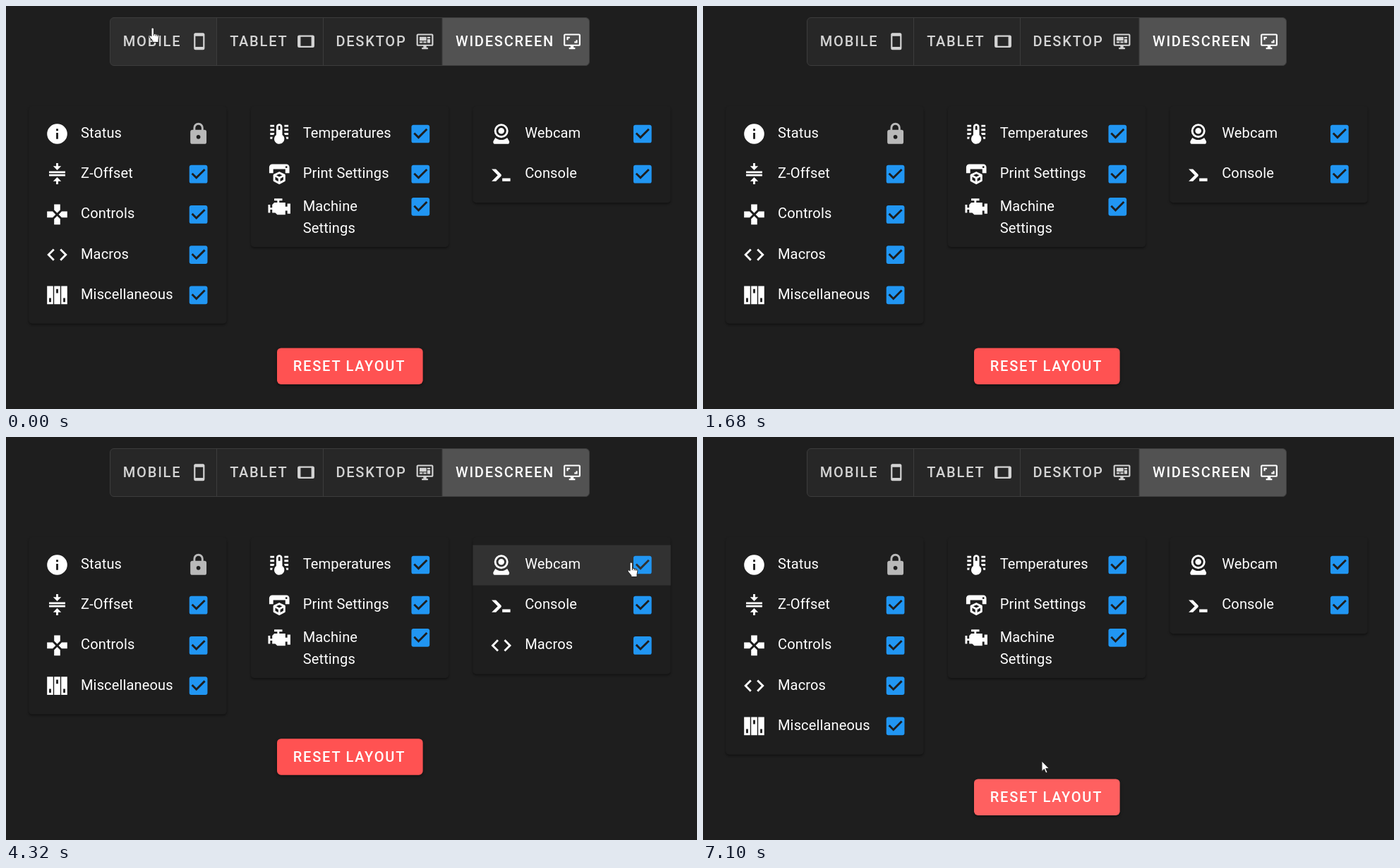
These frames come from a looping animation (979 by 572 pixels, 7170 ms). An HTML page:

```html
<!DOCTYPE html>
<html lang="en">
<head>
<meta charset="utf-8">
<title>Dashboard layout</title>
<style>
html, body { margin: 0; width: 100%; height: 100%; overflow: hidden; background: #1e1e1e; }
svg { display: block; }
#stage { width: 979px; height: 572px; }
text { font: 400 20.02px Roboto, sans-serif; letter-spacing: .143px; fill: #fff; }
.btn { font-weight: 500; letter-spacing: 1.79px; }
.card { fill: #1e1e1e; filter: drop-shadow(0 2px 1.5px rgba(0,0,0,.4)); }
.reset { fill: #ff5252; filter: drop-shadow(0 2px 2px rgba(0,0,0,.4)); }
.line { fill: none; stroke: #3c3c3c; }
</style>
</head>
<body>
<svg id="stage" viewBox="0 0 979 572"></svg>
<script>
const LOOP = 7170, ROW = 57.2, TALL = 62.9, TOP = 153.4, PAD = 11.4, S = 1.43;
const BLUE = [33, 150, 243], GREY = [183, 183, 183];

const ICON = {
  Status: 'M13,9H11V7H13M13,17H11V11H13M12,2A10,10 0 0,0 2,12A10,10 0 0,0 12,22A10,10 0 0,0 22,12A10,10 0 0,0 12,2Z',
  'Z-Offset': 'M4,12H20V14H4V12M4,9H20V11H4V9M16,4L12,8L8,4H11V1H13V4H16M8,19L12,15L16,19H13V22H11V19H8Z',
  Controls: 'M16.5,9L13.5,12L16.5,15H22V9M9,16.5V22H15V16.5L12,13.5M7.5,9H2V15H7.5L10.5,12M15,7.5V2H9V7.5L12,10.5L15,7.5Z',
  Macros: 'M14.6,16.6L19.2,12L14.6,7.4L16,6L22,12L16,18L14.6,16.6M9.4,16.6L4.8,12L9.4,7.4L8,6L2,12L8,18L9.4,16.6Z',
  Miscellaneous: 'M2,3H8V21H2ZM4,15V19H6V15ZM9,3H15V21H9ZM11,6V10H13V6ZM16,3H22V21H16ZM18,15V19H20V15Z',
  Temperatures: 'M17 3H21V5H17V3M17 7H21V9H17V7M17 11H21V13H17.75L17 12.1V11M21 15V17H19C18.97 16.31 18.83 15.63 18.58 15H21M7 3V5H3V3H7M7 7V9H3V7H7M7 11V12.1L6.25 13H3V11H7M3 15H5.42C5.17 15.63 5.03 16.31 5 17H3V15M15 13V5C15 3.34 13.66 2 12 2S9 3.34 9 5V13C6.79 14.66 6.34 17.79 8 20S12.79 22.66 15 21 17.66 16.21 16 14C15.72 13.62 15.38 13.28 15 13M12 4C12.55 4 13 4.45 13 5V8H11V5C11 4.45 11.45 4 12 4Z',
  'Print Settings': 'M19,6A1,1 0 0,0 20,5A1,1 0 0,0 19,4A1,1 0 0,0 18,5A1,1 0 0,0 19,6M19,2A3,3 0 0,1 22,5V11H18V7H6V11H2V5A3,3 0 0,1 5,2H19M18,18.25C18,18.63 17.79,18.96 17.47,19.13L12.57,21.82C12.4,21.94 12.21,22 12,22C11.79,22 11.59,21.94 11.43,21.82L6.53,19.13C6.21,18.96 6,18.63 6,18.25V13C6,12.62 6.21,12.29 6.53,12.12L11.43,9.68C11.59,9.56 11.79,9.5 12,9.5C12.21,9.5 12.4,9.56 12.57,9.68L17.47,12.12C17.79,12.29 18,12.62 18,13V18.25M12,11.65L9.04,13L12,14.6L14.96,13L12,11.65M8,17.66L11,19.29V16.33L8,14.71V17.66M16,17.66V14.71L13,16.33V19.29L16,17.66Z',
  'Machine Settings': 'M7,4V6H10V8H7L5,10V13H3V10H1V18H3V15H5V18H8L10,20H18V16H20V19H23V9H20V12H18V8H12V6H15V4H7Z',
  Webcam: 'M12,2A7,7 0 0,1 19,9A7,7 0 0,1 12,16A7,7 0 0,1 5,9A7,7 0 0,1 12,2M12,4A5,5 0 0,0 7,9A5,5 0 0,0 12,14A5,5 0 0,0 17,9A5,5 0 0,0 12,4M12,6A3,3 0 0,1 15,9A3,3 0 0,1 12,12A3,3 0 0,1 9,9A3,3 0 0,1 12,6M6,22A2,2 0 0,1 4,20C4,19.62 4.1,19.27 4.29,18.97L6.11,15.81C7.69,17.17 9.75,18 12,18C14.25,18 16.31,17.17 17.89,15.81L19.71,18.97C19.9,19.27 20,19.62 20,20A2,2 0 0,1 18,22H6Z',
  Console: 'M13,19V16H21V19H13M8.5,13L2.47,7H6.71L11.67,11.95C12.25,12.54 12.25,13.5 11.67,14.07L6.74,19H2.5L8.5,13Z'
};
const LOCK = 'M12,17A2,2 0 0,0 14,15C14,13.89 13.1,13 12,13A2,2 0 0,0 10,15A2,2 0 0,0 12,17M18,8A2,2 0 0,1 20,10V20A2,2 0 0,1 18,22H6A2,2 0 0,1 4,20V10C4,8.89 4.9,8 6,8H7V6A5,5 0 0,1 12,1A5,5 0 0,1 17,6V8H18M12,3A3,3 0 0,0 9,6V8H15V6A3,3 0 0,0 12,3Z';
const BOX = 'M19,3H5C3.89,3 3,3.89 3,5V19A2,2 0 0,0 5,21H19A2,2 0 0,0 21,19V5C21,3.89 20.1,3 19,3';
const CHECKED = 'M10,17L5,12L6.41,10.58L10,14.17L17.59,6.58L19,8' + BOX + 'Z';
const BLANK = BOX + 'M19,5V19H5V5H19Z';

const SCREEN = 'M21,16V4H3V16H21M21,2A2,2 0 0,1 23,4V16A2,2 0 0,1 21,18H14V20H16V22H8V20H10V18H3C1.89,18 1,17.1 1,16V4C1,2.89 1.89,2 3,2H21';
// label, left, right, text x, icon centre, icon
const TABS = [
  ['MOBILE', 147.5, 298, 165.8, 273.8, 'M17,19H7V5H17M17,1H7C5.89,1 5,1.89 5,3V21A2,2 0 0,0 7,23H17A2,2 0 0,0 19,21V3C19,1.89 18.1,1 17,1Z'],
  ['TABLET', 298, 449, 317.2, 425, 'M19,18H5V6H19M21,4H3C1.89,4 1,4.89 1,6V18A2,2 0 0,0 3,20H21A2,2 0 0,0 23,18V6C23,4.89 22.1,4 21,4Z'],
  ['DESKTOP', 449, 618, 467.4, 593.5, SCREEN + 'M5,6H14V11H5V6M15,6H19V8H15V6M19,9V14H15V9H19M5,12H9V14H5V12M10,12H14V14H10V12Z'],
  ['WIDESCREEN', 618, 826.5, 637, 802, SCREEN + 'M9,6H5V10H7V8H9V6M19,10H17V12H15V14H19V10Z']
];
const TAB_CLICK = [60, 524, 900, 1280];

const split = s => s.split('|').map(c => c.split(','));
const MOBILE = split('Status,Print Settings,Z-Offset,Macros,Controls,Machine Settings,Miscellaneous,Temperatures,Webcam,Console');
const TABLET = split('Status,Webcam,Z-Offset,Controls,Macros,Print Settings,Miscellaneous|Temperatures,Machine Settings,Console');
const DESKTOP = split('Status,Webcam,Z-Offset,Controls,Macros,Miscellaneous|Temperatures,Print Settings,Machine Settings,Console');
const WIDE = split('Status,Z-Offset,Controls,Macros,Miscellaneous|Temperatures,Print Settings,Machine Settings|Webcam,Console');
const COLUMNS = { 1: [272], 2: [34, 508], 3: [32.2, 346.9, 661.4] };

const DRAG = 2400, DROP = 3400, RESET = 6780;
const TOGGLED = { Webcam: 4440, 'Machine Settings': 5620 };
const RING_END = { Webcam: 5800, 'Machine Settings': 6700 };

// time, x, y
const PATH = [
  [0, 207, 31], [485, 207, 31], [490, 403, 28], [750, 403, 28], [880, 545, 34],
  [1120, 545, 34], [1260, 745, 34], [1600, 745, 34], [1740, 560, 210], [2030, 262, 398],
  [2240, 79, 349], [2380, 79, 349], [2480, 260, 318], [2580, 480, 322], [2720, 684, 345],
  [2850, 684, 346], [3070, 683, 322], [3200, 690, 266], [3380, 694, 290], [3610, 694, 290],
  [3900, 790, 250], [4250, 885, 178], [4960, 885, 178], [5090, 870, 232], [5300, 720, 245],
  [5540, 588, 286], [6130, 588, 286], [6560, 480, 460], [LOOP, 480, 460]
];

const clamp = v => Math.max(0, Math.min(1, v));
const mix = (a, b, k) => `rgb(${a.map((v, i) => Math.round(v + (b[i] - v) * k))})`;
const icon = (d, cx, cy, fill = '#fff', s = S) =>
  `<path transform="translate(${cx - 12 * s} ${cy - 12 * s}) scale(${s})" fill="${fill}" fill-rule="evenodd" d="${d}"/>`;
const rect = (x, y, w, h, fill, extra = '') =>
  `<rect x="${x}" y="${y}" width="${w}" height="${h}" fill="${fill}" ${extra}/>`;
const label = (x, y, s, extra = '') => `<text x="${x}" y="${y}" ${extra}>${s}</text>`;

function pointer(t) {
  const i = PATH.findIndex(p => p[0] > t), a = PATH[i - 1], b = PATH[i];
  const k = (t - a[0]) / (b[0] - a[0]);
  return [a[1] + (b[1] - a[1]) * k, a[2] + (b[2] - a[2]) * k];
}

// Grows from the click point towards the centre of its box, then fades.
function ripple(age, px, py, x, y, w, h, strength = .25) {
  if (age < 0 || age > 410) return '';
  const e = 1 - (1 - clamp(age / 180)) ** 3;
  const cx = px - x + (w / 2 - px + x) * e, cy = py - y + (h / 2 - py + y) * e;
  const alpha = strength * (1 - clamp((age - 200) / 210)) ** 2;
  return `<svg x="${x}" y="${y}" width="${w}" height="${h}" overflow="hidden">
    <circle cx="${cx}" cy="${cy}" r="${Math.hypot(w, h) / 2 * (.3 + .7 * e)}" fill="#fff" opacity="${alpha}"/></svg>`;
}

function layout(t) {
  if (t < 160 || t >= RESET) return WIDE;
  if (t < 620) return MOBILE;
  if (t < 1000) return TABLET;
  if (t < 1380) return DESKTOP;
  const home = t < 2540 ? 0 : t < 3130 ? 1 : 2;
  if (home === 0) return WIDE;
  return WIDE.map((c, i) => c.filter(n => n !== 'Macros').concat(i === home ? 'Macros' : []));
}

function checkbox(name, cx, cy, t) {
  if (name === 'Status') return icon(LOCK, cx, cy, '#b9b9b9');
  const at = TOGGLED[name];
  if (!at || t < at) return icon(CHECKED, cx, cy, mix(BLUE, BLUE, 0));
  if (t >= RESET) return icon(CHECKED, cx, cy, mix(GREY, BLUE, clamp((t - RESET) / 220)));
  const color = mix(BLUE, GREY, clamp((t - at - 20) / 230));
  const ring = t < RING_END[name] ? `<circle cx="${cx}" cy="${cy}" r="22" fill="${color}" opacity=".15"/>` : '';
  return ring + icon(BLANK, cx, cy, color);
}

function rowContent(name, x, y, w, t, tall, color = '#fff') {
  const cy = y + (tall ? 17 : 28.1), style = `style="fill:${color}"`;
  const words = tall ? name.split(' ') : [name];
  const base = y + (tall ? 22.8 : 33.6);
  return icon(ICON[name], x + 40.3, cy, color) +
    words.map((s, i) => label(x + 73.8, base + i * 31.46, s, style)).join('') +
    checkbox(name, x + w - 40, cy, t);
}

function tabs(t, px, py) {
  const active = t < 160 ? 3 : t < 620 ? 0 : t < 1000 ? 1 : t < 1380 ? 2 : 3;
  let out = rect(147.5, 16.5, 679, 68, '#272727', 'rx="5.5"');
  TABS.forEach(([name, l, r, tx, ix, d], i) => {
    const age = t - TAB_CLICK[i];
    const hover = py < 84 && px > l && px < r && t < 1620;
    const light = i === active ? .2 : hover ? (i === 0 && age < 0 ? .03 : .11) : 0;
    const left = i === 0 ? `M${r} 16.5H153a5.5 5.5 0 0 0-5.5 5.5V79a5.5 5.5 0 0 0 5.5 5.5H${r}Z` : '';
    const right = i === 3 ? `M${l} 16.5H821a5.5 5.5 0 0 1 5.5 5.5V79a5.5 5.5 0 0 1-5.5 5.5H${l}Z` : '';
    out += `<path d="${left || right || `M${l} 16.5H${r}V84.5H${l}Z`}" fill="#fff" opacity="${light}"/>` +
      ripple(age, px, py, l, 16.5, r - l, 68, .2) +
      `<g opacity="${i === active ? 1 : .8}">${label(tx, 57, name, 'class="btn"')}${icon(d, ix, 50.3, '#fff', 1.085)}</g>`;
  });
  return out + '<rect class="line" x="147.5" y="16.5" width="679" height="68" rx="5.5"/>' +
    '<path class="line" d="M298.5 17V84M449.5 17V84M618 17V84"/>';
}

function cursor(t, x, y, hand, overList) {
  if (t >= 1600 && t < 1740) return '';
  const at = (body, dx = 0) => `<g transform="translate(${x - dx} ${y})" stroke="#222" stroke-width="1">${body}</g>`;
  const arrow = '<path fill="#fff" d="M0 0V14.5L3.4 11.4 5.8 17 8 16 5.7 10.6H10.3Z"/>';
  if (t >= DRAG && t < DROP) {
    const halo = '<circle r="11.5" fill="#b39a12" stroke="none"/>';
    return at(halo + (overList ? arrow :
      '<g fill="none" stroke="#fff" stroke-width="2"><circle r="6"/><path d="M-4.2-4.2L4.2 4.2"/></g>'));
  }
  return at(hand ?
    '<path fill="#fff" d="M5 1.6a1.7 1.7 0 0 1 3.4 0V8l5.8 1.6q1.9.6 1.7 2.6l-.9 4.8v3.5H6.8v-2L2.2 13q-.6-1.6.6-2.1t2.2 1.2z"/>' +
    '<path fill="none" d="M8.4 8v3M11.2 9v2.5M13.6 10v2"/>' : arrow, hand ? 6 : 0);
}

function draw(t) {
  const [px, py] = pointer(t), cols = layout(t), n = cols.length;
  const w = n === 3 ? 280.4 : 430, dragging = t >= DRAG && t < DROP;
  let out = tabs(t, px, py), bottom = 0, overRow = false;

  cols.forEach((names, c) => {
    const x = COLUMNS[n][c], isTall = s => n === 3 && s === 'Machine Settings';
    const height = names.reduce((h, s) => h + (isTall(s) ? TALL : ROW), 2 * PAD);
    let y = TOP, rows = '';
    for (const name of names) {
      const tall = isTall(name), h = tall ? TALL : ROW;
      const hover = t > 3600 && t < RESET && px > x && px < x + w && py > y && py < y + h;
      if (hover) { overRow = true; rows += rect(x, y, w, h, '#fff', 'opacity=".09"'); }
      if (TOGGLED[name]) {
        const [cx, cy] = name === 'Webcam' ? [885, 178] : [588, 286];
        rows += ripple(t - TOGGLED[name] + 15, cx, cy, x, y, w, h);
      }
      const ghost = dragging && name === 'Macros';
      rows += ghost ?
        `<g opacity=".5">${rect(x, y, w, h, '#c8ebfb')}${rowContent(name, x, y, w, t, tall, '#b8b8b8')}</g>` :
        rowContent(name, x, y, w, t, tall);
      y += h;
    }
    out += `<rect class="card" x="${x}" y="${TOP - PAD}" width="${w}" height="${height}" rx="5"/>` + rows;
    bottom = Math.max(bottom, TOP - PAD + height);
  });

  const by = bottom + 34.6, over = t > 6480 && py > 428;
  out += `<rect class="reset" x="384" y="${by}" width="206.6" height="51.5" rx="5.7"/>` +
    (over ? rect(384, by, 206.6, 51.5, '#fff', 'rx="5.7" opacity=".08"') : '') +
    ripple(t - 6700, 480, by + 32, 384, by, 206.6, 51.5) +
    label(406.8, by + 32.5, 'RESET LAYOUT', 'class="btn"');

  if (dragging) {
    out += `<g transform="translate(${px - 47} ${py - 24})" opacity=".75">${rect(0, 0, w, ROW, '#242424')}
      <svg width="${w}" height="${ROW}"><circle cx="53" cy="28" r="52.5" fill="#fff" opacity=".1"/></svg>
      ${rowContent('Macros', 0, 0, w, t)}</g>`;
  }
  const overList = COLUMNS[3].some(x => px > x && px < x + 280) && !(px > 661 && py > 300);
  const hand = (py < 84 && t < 1620) || overRow || (over && t < RESET);
  stage.innerHTML = out + cursor(t, px, py, hand, overList);
}

const stage = document.getElementById('stage');
const start = performance.now();
function tick() {
  draw((performance.now() - start) % LOOP);
  requestAnimationFrame(tick);
}
tick();
</script>
</body>
</html>
```
